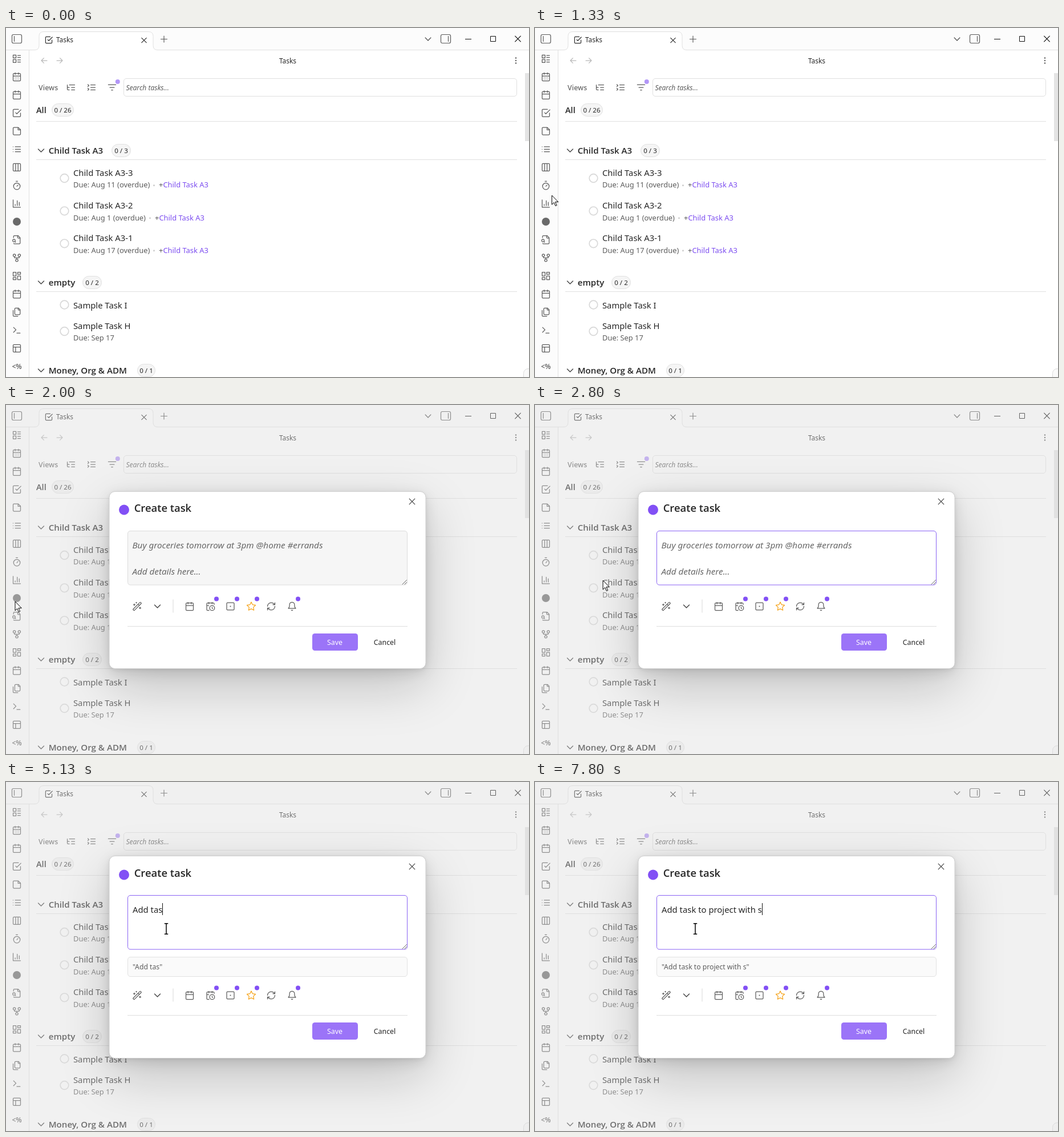
Animation of 917 by 611 pixels, one loop 8000 ms. Source, as an HTML page:

```html
<!DOCTYPE html>
<html lang="en">
<head>
<meta charset="utf-8">
<title>Tasks</title>
<style>
html, body { margin: 0; width: 100%; height: 100%; overflow: hidden; background: #fff; }
svg { display: block; width: 917px; height: 611px; }
text { font-family: "Noto Sans", "Open Sans", sans-serif; white-space: pre; fill: #262626; }
.bold { font-family: "Open Sans", "Noto Sans", sans-serif; font-weight: 600; }
.hint { font-style: italic; fill: #5c5c5c; }
.mid { text-anchor: middle; }
</style>
</head>
<body>
<svg id="stage" viewBox="0 0 917 611" xmlns="http://www.w3.org/2000/svg"></svg>
<script>
const SQUARE = 'M5 3h14a2 2 0 0 1 2 2v14a2 2 0 0 1-2 2H5a2 2 0 0 1-2-2V5a2 2 0 0 1 2-2z';
const CALENDAR = 'M8 2v4M16 2v4M3 10h18M5 4h14a2 2 0 0 1 2 2v14a2 2 0 0 1-2 2H5a2 2 0 0 1-2-2V6a2 2 0 0 1 2-2z';
const ring = (x, y, r) => `M${x + r} ${y}a${r} ${r} 0 1 1-${2 * r} 0a${r} ${r} 0 1 1 ${2 * r} 0`;

const ICONS = {
  rows: 'M3 3h7v7H3zM3 14h7v7H3zM14 4h7M14 9h7M14 15h7M14 20h7',
  calendar: CALENDAR,
  days: CALENDAR + 'M8 14h.01M12 14h.01M16 14h.01M8 18h.01M12 18h.01M16 18h.01',
  check: 'm9 11 3 3L22 4M21 12v7a2 2 0 0 1-2 2H5a2 2 0 0 1-2-2V5a2 2 0 0 1 2-2h11',
  note: 'M15.5 3H5a2 2 0 0 0-2 2v14c0 1.1.9 2 2 2h14a2 2 0 0 0 2-2V8.5L15.5 3ZM15 3v6h6',
  list: 'M8 6h13M8 12h13M8 18h13M3 6h.01M3 12h.01M3 18h.01',
  columns: SQUARE + 'M9 3v18M15 3v18',
  timer: 'M10 2h4M12 14l3-3' + ring(12, 14, 8),
  bars: 'M3 3v18h18M18 17V9M13 17V5M8 17v-3',
  search: 'M14 2v4a2 2 0 0 0 2 2h4M4.3 21A2 2 0 0 0 6 22h12a2 2 0 0 0 2-2V7l-5-5H6a2 2 0 0 0-2 2v3M9 18l-1.5-1.5' + ring(5, 14, 3),
  fork: ring(12, 18, 3) + ring(6, 6, 3) + ring(18, 6, 3) + 'M18 9v2c0 .6-.4 1-1 1H7c-.6 0-1-.4-1-1V9M12 12v3',
  grid: 'M3 3h7v9H3zM14 3h7v5h-7zM14 12h7v9h-7zM3 16h7v5H3z',
  files: 'M20 7h-3a2 2 0 0 1-2-2V2M9 18a2 2 0 0 1-2-2V4a2 2 0 0 1 2-2h7l4 4v10a2 2 0 0 1-2 2ZM3 7.6v12.8A1.6 1.6 0 0 0 4.6 22h9.8',
  prompt: 'm4 17 6-6-6-6M12 19h8',
  table: SQUARE + 'M3 9h18M9 21V9',
  tree: 'M21 12h-8M21 6H8M21 18h-8M3 6v4c0 1.1.9 2 2 2h3M3 10v6c0 1.1.9 2 2 2h3',
  collapse: 'm3 10 2.5-2.5L3 5M3 19l2.5-2.5L3 14M10 6h11M10 12h11M10 18h11',
  filter: 'M2 5h20M6 12h12M10 19h4',
  wand: 'm21.6 3.6-1.2-1.2a1.2 1.2 0 0 0-1.8 0L2.4 18.6a1.2 1.2 0 0 0 0 1.8l1.2 1.2a1.2 1.2 0 0 0 1.8 0L21.6 5.4a1.2 1.2 0 0 0 0-1.8M14 7l3 3M5 6v4M19 14v4M10 2v2M7 8H3M21 16h-4M11 3H9',
  clock: 'M21 7.5V6a2 2 0 0 0-2-2H5a2 2 0 0 0-2 2v14a2 2 0 0 0 2 2h3.5M16 2v4M8 2v4M3 10h5M17.5 17.5 16 16.3V14' + ring(16, 16, 6),
  dot: SQUARE + ring(12, 12, .6),
  star: 'M12 2l3.1 6.3 6.9 1-5 4.9 1.2 6.8L12 17.8 5.8 21 7 14.2 2 9.3l6.9-1z',
  refresh: 'M3 12a9 9 0 0 1 9-9 9.75 9.75 0 0 1 6.74 2.74L21 8M21 3v5h-5M21 12a9 9 0 0 1-9 9 9.75 9.75 0 0 1-6.74-2.74L3 16M8 16H3v5',
  bell: 'M10.3 21a1.94 1.94 0 0 0 3.4 0M6 8a6 6 0 0 1 12 0c0 7 3 9 3 9H3s3-2 3-9',
  back: 'M20 12H4M11 5l-7 7 7 7',
  next: 'M4 12h16M13 5l7 7-7 7'
};

const esc = s => s.replace(/&/g, '&amp;').replace(/</g, '&lt;');
const text = (x, y, size, s, cls = '', fill = '', id = '') =>
  `<text x="${x}" y="${y}" font-size="${size}" class="${cls}"${id && ` id="${id}"`}${fill && ` style="fill:${fill}"`}>${esc(s)}</text>`;
const path = (d, color = '#444', w = 1.2) =>
  `<path d="${d}" fill="none" stroke="${color}" stroke-width="${w}" stroke-linecap="round" stroke-linejoin="round"/>`;
const rule = (d, color = '#e0e0e0') => `<path d="${d}" fill="none" stroke="${color}"/>`;
const box = (x, y, w, h, r, fill, stroke = 'none', more = '') =>
  `<rect x="${x}" y="${y}" width="${w}" height="${h}" rx="${r}" fill="${fill}" stroke="${stroke}" ${more}/>`;
const disc = (x, y, r, fill) => `<circle cx="${x}" cy="${y}" r="${r}" fill="${fill}"/>`;
const icon = (name, x, y, k = .72, color = '#5c5c5c') =>
  `<g transform="translate(${x - 12 * k} ${y - 12 * k}) scale(${k})">${path(ICONS[name], color, 1.25 / k)}</g>`;
const cross = (x, y, r, color = '#333') =>
  path(`M${x - r} ${y - r}l${2 * r} ${2 * r}m0 ${-2 * r}l${-2 * r} ${2 * r}`, color);
const chevron = (x, y, r = 5, color = '#444') =>
  path(`M${x - r} ${y - r / 2}l${r} ${r}l${r} ${-r}`, color, 1.4);
const badge = (x, y, w, s) =>
  box(x + .5, y + .5, w - 1, 22, 11, '#f5f5f5', '#e0e0e0') + text(x + w / 2, y + 16, 11.6, s, 'mid');
const pane = (x, bar) =>
  box(x, 11.5, 17, 15, 2.5, 'none', '#5c5c5c', 'stroke-width="1.2"') + path(`M${bar} 14.5v9`, '#5c5c5c');

function topBar() {
  return box(0, 0, 917, 39, 0, '#fcfcfc') + box(0, 38, 40, 573, 0, '#fcfcfc') +
    rule('M40.5 38.5V611') +
    '<path d="M0 38.5H50q8 0 8-8V14q0-8 8-8H250q8 0 8 8V30.5q0 8 8 8H917V40H41V39z" fill="#fff"/>' +
    rule('M0 38.5H50q8 0 8-8V14.5q0-8 8-8H250q8 0 8 8V30.5q0 8 8 8H917') +
    pane(10.5, 14.5) + pane(762.5, 775.5) +
    icon('check', 75, 21, .62, '#333') + text(88, 25, 11.8, 'Tasks') + cross(242, 21.5, 4.2) +
    path('M271.5 19.5h11M277 14v11', '#5c5c5c') + chevron(740, 19.5, 4.8, '#5c5c5c') +
    rule('M805 19.5h11M849.5 14.5h9v9h-9z', '#111') + cross(897.5, 19, 4.8, '#111');
}

function ribbon() {
  const names = ['rows', 'days', 'calendar', 'check', 'note', 'list', 'columns', 'timer', 'bars', '',
    'search', 'fork', 'grid', 'calendar', 'files', 'prompt', 'table'];
  const step = 31.69;
  return names.map((n, i) => {
    const y = 53.8 + i * step;
    return n ? icon(n, 19, y) : disc(19, y, 7, '#6a6a6a');
  }).join('') + text(19, 597, 12, '<%', 'mid bold', '#5c5c5c');
}

function group(y, name, badgeX, badgeW, count) {
  return chevron(61.5, y + .5) + text(74.7, y + 6, 15.1, name, 'bold') +
    badge(badgeX, y - 11, badgeW, count) + rule(`M53 ${y + 16.5}H896`);
}

function task(y, name, due, linkX) {
  let s = `<circle cx="102.5" cy="${y}" r="7.3" fill="none" stroke="#d8d8d8" stroke-width="1.7"/>`;
  s += text(118, due ? y - 4 : y + 6, 14.8, name);
  if (due) s += text(118, y + 16.3, 12.9, due, '', '#5c5c5c');
  if (linkX) {
    s += disc(linkX - 8.5, y + 12.5, 1.5, '#ccc') +
      `<text x="${linkX}" y="${y + 16.3}" font-size="12.9" style="fill:#7c4df0"><tspan style="fill:#555">+</tspan>Child Task A3</text>`;
  }
  return s;
}

function page() {
  return icon('back', 67, 57, .62, '#b8b8b8') + icon('next', 94, 57, .62, '#b8b8b8') +
    text(494, 62, 11.9, 'Tasks', 'mid') +
    [52.5, 57, 61.5].map(y => disc(894, y, 1.2, '#5c5c5c')).join('') +
    text(57, 109, 12.4, 'Views', 'bold', '#6e6e6e') +
    icon('tree', 114, 104) + icon('collapse', 150, 104) + icon('filter', 186, 104, .66) +
    disc(195.8, 94, 4, '#b397f8') +
    box(206.5, 88.5, 689, 31, 4.5, '#fff', '#e0e0e0') + text(210.5, 109, 12, 'Search tasks...', 'hint') +
    text(53, 149, 14.5, 'All', 'bold') + badge(80, 132, 39, '0 / 26') + rule('M53 163.5H896') +
    group(214, 'Child Task A3', 185, 34, '0 / 3') +
    task(263, 'Child Task A3-3', 'Due: Aug 11 (overdue)', 268) +
    task(320.3, 'Child Task A3-2', 'Due: Aug 1 (overdue)', 261) +
    task(377.3, 'Child Task A3-1', 'Due: Aug 17 (overdue)', 268) +
    group(445, 'empty', 134, 34, '0 / 2') +
    task(484.5, 'Sample Task I') + task(531, 'Sample Task H', 'Due: Sep 17') +
    group(599, 'Money, Org & ADM', 230, 32, '0 / 1') +
    box(910, 79, 8, 119, 0, '#e4e4e4') +
    box(907.5, 596.5, 30, 30, 8, '#fafafa', '#dcdcdc');
}

function dialog() {
  const shadows = [[1.8, 3.6, .07], [6.3, 12, .11], [30, 45, .2]].map(([dy, blur, a]) =>
    `<rect class="panel" x="181" width="555" rx="10" transform="translate(0 ${dy})" opacity="${a}" style="filter:blur(${blur}px)"/>`).join('');
  const dots = [369, 405, 440, 512].map(x => disc(x, 339.5, 4, '#8250f5')).join('');
  return shadows +
    '<rect class="panel" x="181" width="555" rx="10" fill="#fff" stroke="#cfcfcf"/>' +
    '<g id="head">' + disc(207, 183.5, 9, '#8250f5') + text(224.7, 187.3, 18.4, 'Create task', 'bold') +
      cross(712, 169, 4.8, '#444') + '</g>' +
    '<g id="field">' + box(213.5, 220.5, 490, 94.5, 4.5, '#f6f6f6', '#dcdcdc', 'id="area"') +
      path('M695 314l7.5-7.5M699 314l3.5-3.5', '#666', 1) +
      '<g id="hints">' + text(221.5, 251, 15.2, 'Buy groceries tomorrow at 3pm @home #errands', 'hint', '#666') +
      text(221.5, 297, 15.2, 'Add details here...', 'hint', '#666') + '</g>' +
      text(222, 251, 14.85, '', '', '', 'typed') +
      '<path id="caret" d="M.5 234V255" stroke="#111"/></g>' +
    '<g id="preview">' + box(213.5, 306.5, 490, 34, 4.5, '#fafafa', '#e2e2e2') +
      text(222, 328, 12.2, '', '', '#5c5c5c', 'echo') + '</g>' +
    '<g id="foot">' + icon('wand', 230, 352.5) + chevron(265.5, 352.5) + rule('M293 340.5V363.5', '#d8d8d8') +
      icon('calendar', 322, 352.5) + icon('clock', 358.5, 352.5) + icon('dot', 393.5, 352.5) +
      icon('star', 430, 352.5, .75, '#f5a31a') + icon('refresh', 465, 352.5) + icon('bell', 501.5, 352.5) +
      dots + rule('M213 387.5H704', '#dedede') +
      box(537, 400, 80, 30, 4.5, '#9b74f8') + text(576.5, 420, 12.4, 'Save', 'mid', '#fff') +
      text(664, 420, 12.4, 'Cancel', 'mid') + '</g>';
}

const stage = document.getElementById('stage');
stage.innerHTML = box(0, 0, 917, 611, 0, '#fff') + topBar() +
  box(4, 325, 29, 26, 4, '#f0f0f0', 'none', 'id="hover"') +
  `<g id="ribbon">${ribbon()}</g>` + page() +
  `<g id="modal">${box(0, 0, 917, 611, 0, '#dcdcdc', 'none', 'opacity=".4"')}${dialog()}</g>` +
  '<path id="resize" d="M-7-7h6l-2 2 8 8 2-2v6h-6l2-2-8-8-2 2z" fill="#fff" stroke="#000" stroke-width="1.2"/>' +
  '<path id="arrow" d="M0 0v16l3.7-3.6 2.6 6 2.3-1-2.6-5.9h5.2z" fill="#fff" stroke="#000"/>' +
  '<path id="beam" d="M-3.2-9.3H3.2M0-9.3V9.3M-3.2 9.3H3.2" stroke="#000" stroke-width="1.5"/>';

const $ = id => document.getElementById(id);
const panels = [...document.querySelectorAll('.panel')];
const show = (id, on) => $(id).setAttribute('visibility', on ? 'inherit' : 'hidden');
const move = (id, x, y) => $(id).setAttribute('transform', `translate(${x} ${y})`);

const LOOP = 8000, TICK = 200 / 3;
const PHRASE = 'Add task to project with s';
// time, x, y of the pointer
const TRACK = [[400, 20, 21], [800, 91, 40], [930, 106, 80], [1200, 43, 270], [1500, 14, 320],
  [1730, 10, 340], [1930, 16, 344], [2400, 16, 344], [2600, 17, 339], [3130, 281, 256.5], [3400, 281, 257]];
// when each next letter lands
const KEYS = [4330, 4470, 4600, 4730, 4930, 5000, 5130, 5270, 5330, 6000, 6070, 6200, 6400, 6530, 6600,
  6800, 6800, 7000, 7130, 7270, 7330, 7470, 7530, 7600, 7730, 7800];

function pointer(t) {
  const i = TRACK.findIndex(p => p[0] > t);
  if (i < 0) return TRACK[TRACK.length - 1].slice(1);
  if (i === 0) return TRACK[0].slice(1);
  const [t0, x0, y0] = TRACK[i - 1], [t1, x1, y1] = TRACK[i];
  const k = (t - t0) / (t1 - t0);
  return [x0 + (x1 - x0) * k, y0 + (y1 - y0) * k];
}

function draw(time) {
  const t = Math.floor((time % LOOP + 5) / TICK) * TICK + 5;
  const open = t >= 2000, focus = t >= 2066, grown = t >= KEYS[0];
  const count = KEYS.filter(k => k <= t).length;
  const [x, y] = pointer(t);

  const inField = open && x > 213 && y < 316;
  const sizing = t < 870;
  show('resize', t >= 400 && sizing);
  show('arrow', !sizing && !inField);
  show('beam', inField);
  for (const id of ['resize', 'arrow', 'beam']) move(id, x, y);

  show('hover', !open && t > 1270 && x < 34 && y > 324 && y < 354);
  move('ribbon', 0, t >= 1870 ? -1 : 0);

  show('modal', open);
  for (const p of panels) {
    p.setAttribute('y', grown ? 129.5 : 151.5);
    p.setAttribute('height', grown ? 354 : 310);
  }
  move('head', 0, grown ? -21 : 0);
  move('field', 0, grown ? -22 : 0);
  move('foot', 0, grown ? 21 : 0);
  $('area').setAttribute('fill', focus ? '#fff' : '#f6f6f6');
  $('area').setAttribute('stroke', focus ? '#8a63f4' : '#dcdcdc');
  show('hints', !grown);
  show('preview', grown);

  const typed = PHRASE.slice(0, count);
  $('typed').textContent = typed;
  $('echo').textContent = `"${typed}"`;
  const since = count ? t - KEYS[count - 1] : t - 2066;
  show('caret', focus && Math.floor(since / 533) % 2 === 0);
  move('caret', Math.round(222 + (count ? $('typed').getComputedTextLength() : 0)), 0);
}

function tick() {
  draw(performance.now());
  requestAnimationFrame(tick);
}
tick();
</script>
</body>
</html>
```
